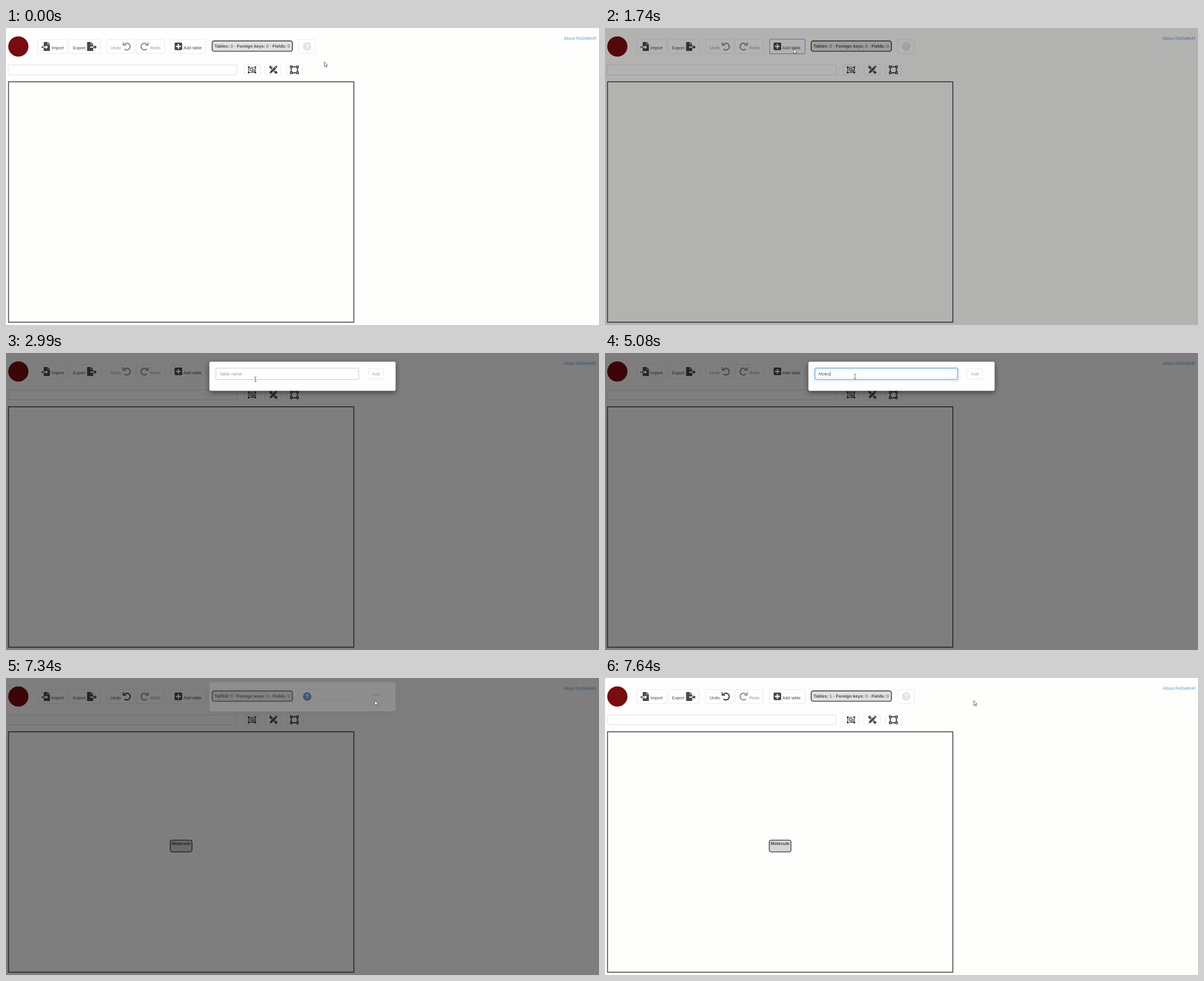
Recreate the animation shown at these times as an HTML page. Size 1057 by 530 pixels, loop 8000 ms.

```html
<!DOCTYPE html>
<html lang="en">
<head>
<meta charset="utf-8">
<title>Adding a table</title>
<style>
  html, body { margin: 0; width: 100%; height: 100%; overflow: hidden; background: #fefefd; }
  svg { display: block; font: 7.71px "Liberation Sans", Arial, sans-serif; fill: #484848; text-rendering: geometricPrecision; }
  .btn { fill: #fefefe; stroke: #e9ebeb; }
  .field { fill: #fefefe; stroke: #dcdfdf; }
  .hole { fill: #fefefe; }
  .line { fill: none; stroke: #484848; }
  .off { opacity: .58; }
  .focus { fill: none; stroke: #62a8ea; }
  .bold { font-weight: bold; }
  #modal > rect:first-child { filter: drop-shadow(0 3px 5px rgba(0, 0, 0, .5)); }
  #glow { filter: drop-shadow(0 0 2.5px #66afe9); }
</style>
</head>
<body>
<svg width="1057" height="530" viewBox="0 0 1057 530">
  <defs>
    <path id="file" d="M0 1q0-1 1-1h5.5v4.5h4.5v10.500q0 1-1 1h-9q-1 0-1-1zM7.300 0l3.700 3.700h-3.700z"/>
    <g id="turn">
      <path class="line" stroke-width="2.2" d="M-5.500-2.300A6 6 0 1 1-4.300 4.400"/>
      <path d="M-7.600-7.800h1.800v4.300h4.400v2h-6.200z"/>
    </g>
  </defs>

  <circle cx="22" cy="33" r="18" fill="#780c0e"/>
  <text x="994.300" y="20.500" fill="#5a9fd8">About ReDaMoR</text>

  <g class="btn">
    <rect x="56.500" y="20.500" width="53" height="25" rx="2"/>
    <rect x="112.500" y="20.500" width="56" height="25" rx="2"/>
    <rect x="179.500" y="20.500" width="50" height="25" rx="2"/>
    <rect x="232.500" y="20.500" width="50" height="25" rx="2"/>
    <rect x="293.500" y="20.500" width="63" height="25" rx="2"/>
    <rect x="521.500" y="20.500" width="30" height="25" rx="2"/>
    <rect x="424.500" y="65.500" width="29" height="18.500" rx="2"/>
    <rect x="461.500" y="65.500" width="29" height="18.500" rx="2"/>
    <rect x="499.500" y="65.500" width="29" height="18.500" rx="2"/>
  </g>
  <rect id="ring" class="focus" x="293.500" y="20" width="63" height="26" rx="1"/>

  <use href="#file" x="67.300" y="25"/>
  <path d="M63.300 33h4v2.200h-4z"/>
  <path class="hole" d="M67.300 33h3.700v-2.500l4 3.600-4 3.600v-2.500h-3.700z"/>
  <text x="81" y="38.300">Import</text>

  <text x="119.500" y="38.300">Export</text>
  <use href="#file" x="144.500" y="25"/>
  <path class="hole" d="M150 33h5.500v2.200h-5.500z"/>
  <path d="M155.500 33h2.300v-2.500l4 3.600-4 3.600v-2.500h-2.300z"/>

  <g id="undo">
    <text x="186.300" y="38.300">Undo</text>
    <use href="#turn" x="215.500" y="33"/>
  </g>
  <g class="off">
    <use href="#turn" transform="translate(246.800 33) scale(-1 1)"/>
    <text x="257" y="38.300">Redo</text>
  </g>

  <rect x="300.500" y="26" width="13.500" height="13.500" rx="1.800"/>
  <path class="hole" d="M306.200 28.500h2.200v3.200h3.200v2.200h-3.200v3.200h-2.200v-3.200h-3.200v-2.200h3.200z"/>
  <text x="316.300" y="38.300">Add table</text>

  <rect x="367.500" y="23.200" width="143" height="18.300" rx="3.500" fill="#dfe1e0" stroke="#484848" stroke-width="1.700"/>
  <text x="371.800" y="35"><tspan class="bold">Tables:</tspan> <tspan id="count">0</tspan> - <tspan class="bold">Foreign keys:</tspan> 0 - <tspan class="bold">Fields:</tspan> 0</text>

  <circle id="help" cx="536.800" cy="33" r="7.500"/>
  <text class="hole bold" x="536.800" y="37.200" font-size="11.500" text-anchor="middle">?</text>

  <rect class="field" x="4" y="66" width="408" height="17.500" rx="2"/>

  <g class="line">
    <path d="M432.500 70h12v9.500h-12z" stroke-width="1.200"/>
    <path d="M435.300 72.300h4.500v3.700h-4.500zM440 74h2.500v3.700h-4.500v-1.500" stroke-width="1.200"/>
  </g>
  <path d="M431 68.500h3v3h-3zM443 68.500h3v3h-3zM431 78h3v3h-3zM443 78h3v3h-3z"/>

  <g transform="translate(476.500 74.500) rotate(45)">
    <rect x="-9" y="-2.200" width="18" height="4.400" rx=".8"/>
    <path class="hole" d="M-6.500-2.200h1v2h-1zM-3.500-2.200h1v2h-1zM4-2.200h1v2h-1z"/>
    <path d="M-2.700-9.500h5.400v19h-5.400z" class="hole"/>
    <path d="M-2-7.500q0-1.500 1-1.500h2q1 0 1 1.500v13l-2 4-2-4z"/>
    <path class="hole" d="M-2-6.300h4v.8h-4z"/>
  </g>

  <path class="line" stroke-width="1.900" d="M508.500 69.300h11v10.700h-11z"/>
  <path d="M506 67h4.800v4.800h-4.800zM517.200 67h4.800v4.800h-4.800zM506 77.500h4.800v4.800h-4.800zM517.200 77.500h4.800v4.800h-4.800z"/>
  <path class="hole" d="M507.700 68.700h1.500v1.500h-1.500zM518.800 68.700h1.500v1.500h-1.500zM507.700 79.100h1.500v1.500h-1.500zM518.800 79.100h1.500v1.500h-1.500z"/>

  <rect class="line" x="4.500" y="96" width="615.500" height="429" stroke="#555" stroke-width="1.600"/>
  <g id="node">
    <rect x="292.700" y="289.300" width="38.800" height="21" rx="3.500" fill="#d5d5d5" stroke="#333" stroke-width="1.300"/>
    <text class="bold" x="312.100" y="298.200" font-size="7.900" text-anchor="middle">Molecule</text>
  </g>

  <rect id="dim" width="1057" height="530" fill="#000"/>

  <g id="modal">
    <rect x="362.500" y="15.500" width="332" height="52" rx="3" fill="#fefefd"/>
    <rect class="field" x="374" y="27" width="254.800" height="20.500" rx="2" style="stroke:#c8cbcb"/>
    <rect id="glow" class="focus" x="374" y="27" width="254.800" height="20.500" rx="2"/>
    <text id="word" x="380.700" y="40"></text>
    <path id="caret" d="M0 33.300h.7v8.400h-.7z"/>
    <rect class="btn" x="646" y="28" width="27.500" height="19" rx="2"/>
    <text id="add" x="652.800" y="40">Add</text>
  </g>

  <path id="arrow" d="M.3.300v8.800l2-1.900 1.500 3.100 1.300-.6-1.400-3h2.700z" fill="#fff" stroke="#333" stroke-width=".7"/>
  <path id="beam" class="line" stroke-width=".8" d="M-2-4.200h1.500l.5.500.5-.5h1.500M0-3.700v7.400M-2 4.200h1.500l.5-.5.5.5h1.500"/>
</svg>
<script>
const LOOP = 8000, NAME = 'Molecule';
const keys = [4160, 4390, 4620, 4770, 5080, 5230, 5400, 5470];
const FOCUS = 3290, BLUR = 6950, CREATED = 7250;
// time, x, y of the pointer
const path = [
  [470, 567, 60], [550, 560, 66], [710, 470, 64], [870, 340, 27], [950, 336, 37],
  [1850, 336, 37], [2130, 392, 204], [2330, 392, 204], [2670, 440, 57],
  [2790, 440, 57], [2990, 444.5, 47], [3130, 444.5, 47], [3140, 445.5, 42],
  [6300, 445.5, 42], [6500, 520, 44], [6800, 657, 40]
];
const $ = id => document.getElementById(id);
const ramp = (t, start, length) => Math.min(1, Math.max(0, (t - start) / length));
const easeOut = p => 1 - (1 - p) ** 1.7;
const set = (id, name, value) => $(id).setAttribute(name, value);
const show = (id, on) => set(id, 'visibility', on ? 'visible' : 'hidden');

function pointer(t) {
  const i = path.findIndex(p => p[0] > t);
  if (i < 0) return path.at(-1).slice(1);
  if (!i) return path[0].slice(1);
  const [a, b] = [path[i - 1], path[i]], k = ramp(t, a[0], b[0] - a[0]);
  return [1, 2].map(j => a[j] + (b[j] - a[j]) * k);
}

function draw(t) {
  const created = t >= CREATED;
  $('count').textContent = +created;
  show('node', created);
  set('undo', 'class', created ? '' : 'off');
  set('help', 'fill', (t + 2050) % 2130 < 1065 ? '#3d7ec0' : '#e0e4e5');
  set('ring', 'opacity', t < 2000 ? ramp(t, 1400, 80) : 0);

  set('dim', 'opacity', .5 * (ramp(t, 1650, 150) - ramp(t, 7480, 150)));
  const slide = easeOut(ramp(t, 1830, 300)) - easeOut(ramp(t, 7210, 300));
  set('modal', 'opacity', ramp(t, 1830, 150) - ramp(t, 7210, 150));
  set('modal', 'transform', `translate(0 ${-13 * (1 - slide)})`);

  const typed = keys.filter(k => k <= t).length;
  const last = typed ? keys[typed - 1] : FOCUS;
  $('word').textContent = typed ? NAME.slice(0, typed) : 'Table name';
  set('word', 'fill', typed ? '#555' : '#999');
  set('glow', 'opacity', ramp(t, FOCUS - 50, 150) - ramp(t, BLUR - 50, 130));
  const end = typed ? $('word').getComputedTextLength() : 0;
  set('caret', 'transform', `translate(${380.7 + end} 0)`);
  set('caret', 'opacity', +(t >= FOCUS && t < BLUR && (t - last) % 1100 < 550));
  set('add', 'fill', t < 6110 ? '#a5a5a5' : '#484848');

  const [x, y] = pointer(t), overField = t > 2860 && x < 629;
  for (const id of ['arrow', 'beam']) {
    set(id, 'transform', `translate(${x} ${y})`);
    show(id, overField === (id === 'beam'));
  }
}

const begin = performance.now();
function tick() {
  draw((performance.now() - begin) % LOOP);
  requestAnimationFrame(tick);
}
tick();
</script>
</body>
</html>
```
